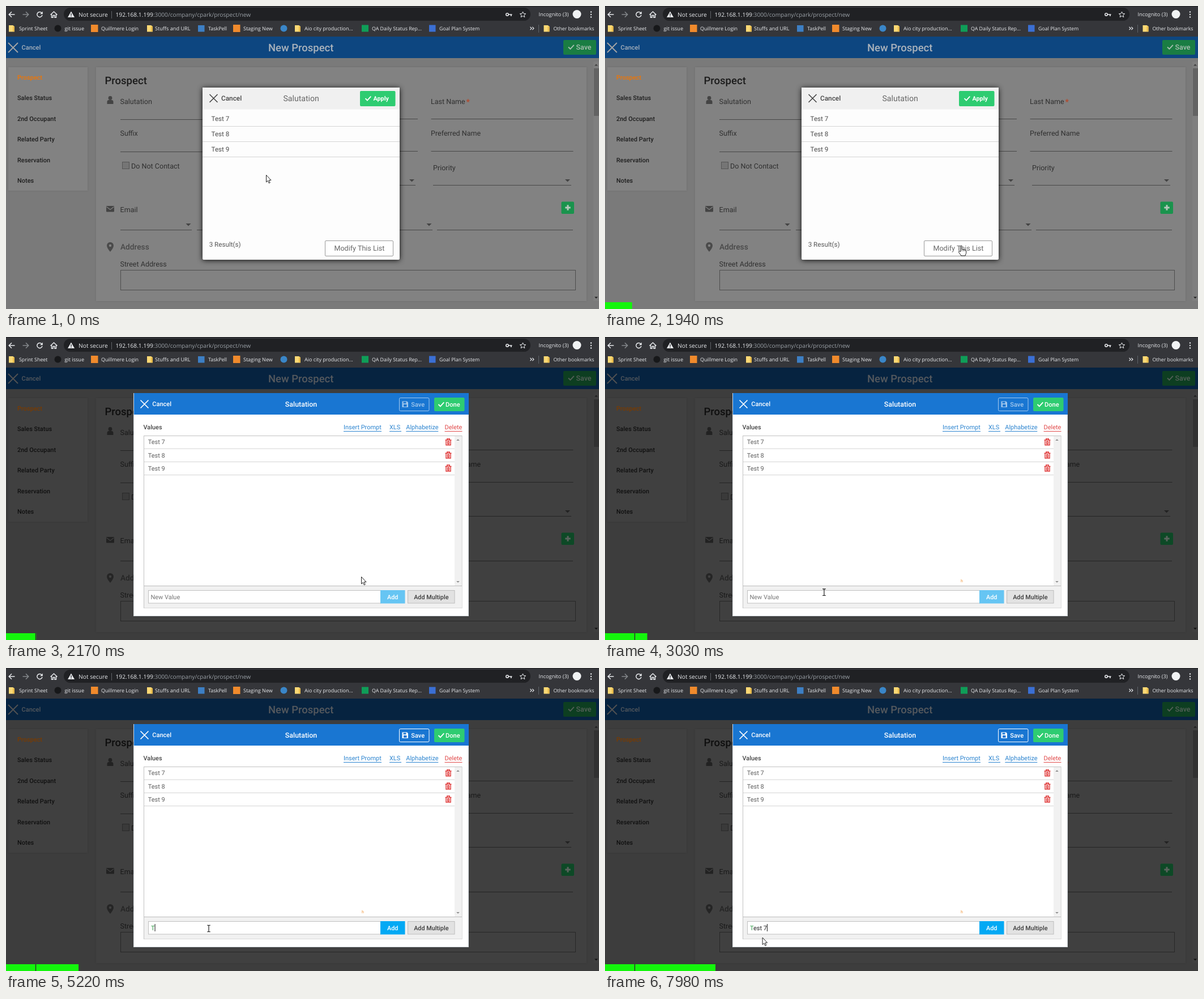
An HTML page that plays this animation: 1047 by 535 pixels, repeating every 8000 ms.

```html
<!DOCTYPE html>
<html lang="en">
<head>
<meta charset="utf-8">
<title>New Prospect</title>
<style>
html, body { margin: 0; width: 100%; height: 100%; overflow: hidden; background: #7a7a7a; }
svg { display: block; width: 100%; height: 100%; }
text { font-family: Roboto, sans-serif; white-space: pre; text-rendering: geometricPrecision; }
.ui text { font-family: "Open Sans", "Noto Sans", sans-serif; }
.card { filter: drop-shadow(0 0 1.5px rgba(0,0,0,.12)); }
.modal { filter: drop-shadow(0 1px 5px rgba(0,0,0,.9)); }
.tab { filter: drop-shadow(0 0 2px rgba(255,225,180,.8)); }
</style>
</head>
<body>
<svg id="stage" viewBox="0 0 1047 535" preserveAspectRatio="none"></svg>
<script>
const text = (x, y, size, fill, str, weight = 400, extra = '') =>
  `<text x="${x}" y="${y}" font-size="${size}" fill="${fill}" font-weight="${weight}" ${extra}>${str}</text>`;
const rect = (x, y, w, h, fill, extra = '') =>
  `<rect x="${x}" y="${y}" width="${w}" height="${h}" fill="${fill}" ${extra}/>`;
const line = (d, color, width = 1, extra = '') =>
  `<path d="${d}" fill="none" stroke="${color}" stroke-width="${width}" ${extra}/>`;
const shape = (d, fill, extra = '') => `<path d="${d}" fill="${fill}" ${extra}/>`;
const circle = (x, y, r, fill) => `<circle cx="${x}" cy="${y}" r="${r}" fill="${fill}"/>`;
const group = (id, body, extra = '') => `<g id="${id}" ${extra}>${body}</g>`;
const rule = (x1, x2, y, color) => rect(x1, y, x2 - x1, 1, color);
const cross = (x, y, r, color, w) =>
  line(`M${x - r} ${y - r}L${x + r} ${y + r}M${x + r} ${y - r}L${x - r} ${y + r}`, color, w);
const check = (x, y, color) => line(`M${x} ${y}l3.4 3.4 6.4 -7`, color, 1.8);
const caretDown = (x, y, color, r = 4.5) => shape(`M${x - r} ${y}h${2 * r}l${-r} ${r}z`, color);
const caretUp = (x, y, color, r = 3) => shape(`M${x - r} ${y}h${2 * r}l${-r} ${-r}z`, color);
const folder = x => shape(`M${x} 34h7l3 2v9.5h-10z`, '#fbd975') + rect(x + 7, 36, 3, 9, '#e8bb4c');

function browser() {
  const w = '#e8eaed', g = '#9aa0a6';
  const labels = [
    [23, 8.9, 'Sprint Sheet'], [103.5, 9.1, 'git issue'], [168, 8.95, 'Quillmere Login'],
    [263, 9.15, 'Stuffs and URL'], [357, 8.95, 'TaskPell'], [419, 9, 'Staging New'],
    [527, 9, 'Aio city production...'], [646, 8.85, 'QA Daily Status Rep...'],
    [765, 8.85, 'Goal Plan System'], [966.5, 8.75, 'Other bookmarks']];
  return rect(0, 0, 1047, 54, '#35363a') + rect(102, 3, 824, 23, '#202124', 'rx="11.5"') +
    rect(0, 0, 1047, 1, '#202124') +
    line('M15.5 15H5.5M10 10.2L5.2 15L10 19.8', w, 1.5) +
    line('M29.5 15H39.5M35 10.2L39.8 15L35 19.8', '#85888c', 1.5) +
    line('M63 12A4.6 4.6 0 1 0 64 16', w, 1.5) + shape('M64.8 9.5v4.7h-4.7z', w) +
    line('M78.5 15.5L84.5 10L90.5 15.5M80.5 14.5V20.3H83V16.5H86V20.3H88.5V14.5', w, 1.5) +
    shape('M115 9.5L121 20H109z', w) + rect(114.4, 13, 1.3, 3.6, '#202124') + rect(114.4, 17.5, 1.3, 1.3, '#202124') +
    text(128, 18.5, 10.25, w, 'Not secure') + rect(186, 9, 1, 13, '#5f6368') +
    text(193.5, 18.5, 10.2, g, `<tspan fill="${w}">192.168.1.199</tspan>:3000/company/cpark/prospect/new`) +
    `<circle cx="885" cy="15" r="2.2" fill="none" stroke="${w}" stroke-width="1.6"/>` +
    line('M887 15H893.5M891.8 15V18', w, 1.7) +
    line('M912.5 10l1.5 3.4 3.7.3-2.8 2.4.9 3.6-3.3-2-3.3 2 .9-3.6-2.8-2.4 3.7-.3z', w, 1) +
    text(940.5, 18.3, 9.2, w, 'Incognito (3)') + circle(1008, 14.5, 7.5, '#f1f3f4') +
    [10.5, 15, 19.5].map(y => circle(1033, y, 1.2, w)).join('') +
    [5, 249, 510, 949.5].map(folder).join('') +
    circle(91.5, 39.5, 6, '#17181a') + rect(150, 33, 12.5, 13, '#f08a2c') + rect(339, 34, 11.5, 11.5, '#3d7fc4') +
    rect(401, 33, 12.5, 13, '#f08a2c') + circle(490.5, 39.5, 6, '#3a86c8') +
    rect(628, 33.5, 12, 12, '#0f9d58') + rect(747, 33.5, 11.5, 12, '#3b6fd4') +
    labels.map(([x, s, str]) => text(x, 42.8, s, w, str)).join('') +
    line('M925.5 36.8l2.6 2.7-2.6 2.7M929.3 36.8l2.6 2.7-2.6 2.7', w, 1.2) + rect(940, 33, 1, 14, '#5f6368');
}

function page() {
  const ink = '#303030', rim = '#484848', icon = '#444';
  const label = (x, y, str) => text(x, y, 12.55, ink, str);
  const side = ['Prospect', 'Sales Status', '2nd Occupant', 'Related Party', 'Reservation', 'Notes'];
  return rect(0, 54, 1047, 481, '#7a7a7a') +
    rect(0, 54, 1047, 38, '#0d4680') +
    cross(12.5, 73.5, 8.5, '#a6a6a6', 1.8) + text(27.5, 77.2, 11, '#a9b2bb', 'Cancel', 500) +
    text(463, 80, 18.45, '#a9b2bb', 'New Prospect', 500) +
    rect(984, 60, 58, 26, '#1a7d43', 'rx="2"') + check(993, 72.5, '#a9bfb1') +
    text(1006.5, 77, 12.5, '#a9bfb1', 'Save', 500) +
    rect(4, 108, 140, 218, '#828282', 'class="card"') + rect(159, 108, 866, 413, '#828282', 'class="card"') +
    side.map((s, i) => text(20, 130 + i * 36.4, 10.95, i ? '#1e1e1e' : '#f27500', s, 500)).join('') +
    text(174.5, 137.5, 18.5, '#1c1c1c', 'Prospect', 500) +
    circle(184, 162.5, 3.4, icon) + shape('M178.5 173v-3.5q0-3.5 3-3.5h5q3 0 3 3.5v3.5z', icon) +
    label(201.5, 172.5, 'Salutation') + label(750, 172.5, 'Last Name') + text(812.5, 174, 14, '#b5482a', '*', 700) +
    label(201.5, 229, 'Suffix') + label(750, 229, 'Preferred Name') +
    [199, 256].map(y => rule(202, 453, y + 1, rim) + rule(476, 727, y, rim) + rule(750.5, 1001.5, y, rim)).join('') +
    rect(205.5, 275.5, 12, 12, '#757575', 'stroke="#555"') + label(221, 287, 'Do Not Contact') +
    label(754, 289.5, 'Priority') + rule(476, 723, 316, rim) + rule(754, 998, 316, rim) +
    caretDown(716.5, 306, icon) + caretDown(991.5, 306, icon) +
    rect(177, 353, 14, 10.5, icon, 'rx="1"') + line('M177.5 354.5l6.5 5 6.5-5', '#828282', 1.2) +
    label(201.5, 364, 'Email') +
    [[202, 328], [337, 453], [476, 753], [761, 1001]].map(([a, b]) => rule(a, b, 395, rim)).join('') +
    caretDown(322, 384, icon) + caretDown(747, 384, icon) +
    rect(980.5, 345.5, 22.5, 21.5, '#1a934d', 'rx="2"') + line('M992 351.3v9.4M987.3 356h9.4', '#b4c8bb', 3) +
    shape('M184 434q-6-7-6-11a6 6 0 0 1 12 0q0 4-6 11z', '#4a4a4a') + circle(184, 423, 2.2, '#828282') +
    text(202, 430, 13.7, '#484848', 'Address', 500) + label(201.5, 460, 'Street Address') +
    rect(202.5, 466.5, 803, 35, 'none', 'stroke="#4e4e4e"') +
    rect(1037, 98, 10, 423, '#7f7f7f') + rect(1038, 110, 9, 84, '#636363') +
    caretUp(1042, 105.5, '#3c3c3c') + caretDown(1042, 513.5, '#1e1e1e', 3);
}

function picker() {
  const ink = '#4c4c4c';
  return `<g class="modal">${rect(347, 144, 348, 304, '#fdfdfd', 'rx="2"')}</g>` + rect(347, 144, 348, 38.5, '#f0f0f0') +
    cross(366.5, 163, 7, '#444', 1.6) + text(380, 167, 11.8, '#444', 'Cancel', 500) +
    text(489.5, 167.5, 14.1, '#666', 'Salutation') +
    rect(625, 150, 62.5, 27, '#2ecc71', 'rx="2"') + check(634.5, 163.2, '#fff') + text(648.5, 167.3, 10.8, '#fff', 'Apply', 700) +
    [7, 8, 9].map((d, i) => text(362.5, 203 + i * 27.1, 11.65, ink, 'Test ' + d) + rule(347, 695, 212 + i * 27, '#d4d4d4')).join('') +
    text(358.7, 425.3, 11.65, '#555', '3 Result(s)') +
    rect(563.5, 414.5, 120, 27, '#fff', 'rx="1.5" stroke="#999"') + text(579.5, 432, 12.55, '#666', 'Modify This List');
}

function trash(y) {
  const c = '#e03c3c';
  return line(`M775.5 ${y - 3.5}h11M778.8 ${y - 4}v-1.8h4.4v1.8`, c, 1.5) +
    line(`M777 ${y - 3}v8.2h8v-8.2M779.7 ${y - 1}v4.2h2.6v-4.2z`, c, 1.5);
}

function editor() {
  const link = (x, w, str, c = '#2a83cf') => text(x, 163.3, 10.95, c, str) + rule(x, x + w, 166, c);
  return rect(225.5, 99.5, 591, 393, '#fff', 'stroke="#d5dbe0"') + rect(226, 99, 591, 38, '#1976d2') +
    cross(244.5, 118.5, 7, '#fff', 1.7) + text(258.3, 122, 11, '#fff', 'Cancel', 500) +
    text(492.8, 123, 12.4, '#fff', 'Salutation', 500) +
    group('save', rect(694.5, 107.5, 52.5, 23, 'none', 'rx="2" stroke="#fff"') +
      shape('M699.5 113.5h8.5l2 2v8.5h-10.5z', '#fff') + rect(701.5, 114.5, 5, 2.8, '#1976d2') + rect(702, 119, 5.5, 4, '#1976d2') +
      text(715.3, 123, 11, '#fff', 'Save', 500)) +
    rect(756, 107, 53.5, 24, '#2ecc71', 'rx="2"') + check(763.5, 119, '#fff') + text(776, 123, 11.1, '#fff', 'Done', 500) +
    text(242.5, 163.3, 10.9, '#444', 'Values', 500) +
    link(596, 67, 'Insert Prompt') + link(677, 21, 'XLS') + link(706.3, 57, 'Alphabetize') + link(774.5, 31, 'Delete', '#e04848') +
    rect(243.5, 174.5, 561.5, 304, '#fff', 'stroke="#c2c2c2"') +
    rect(792, 175, 12.5, 264, '#f1f1f1') + caretUp(798, 183, '#8a8a8a', 2.8) + caretDown(798, 431, '#8a8a8a', 2.8) +
    [7, 8, 9].map((d, i) => text(250.8, 189.3 + i * 23.2, 10.95, '#5c5c5c', 'Test ' + d) +
      rule(244, 792, 196.7 + i * 23.2, '#d4d4d4') + trash(185.5 + i * 23.2)).join('') +
    rect(244, 439, 561, 39.5, '#f1f1f1') + rule(243, 805, 439, '#bdbdbd') +
    rect(251.5, 447.5, 410, 22.5, '#fff', 'stroke="#c0c0c0"') +
    rect(661, 447, 43.5, 23.5, '#66c5f3', 'id="add"') + text(673, 462.6, 10.8, '#fff', 'Add', 500) +
    rect(709.5, 447.5, 82.5, 22.5, '#e2e2e2', 'stroke="#bdbdbd"') + text(720.2, 462.6, 10.8, '#3c3c3c', 'Add Multiple', 500) +
    text(255.5, 462.6, 10.95, '#757575', 'New Value', 400, 'id="hint"') +
    text(256, 462.6, 10.95, '#222', '<tspan id="head" fill="#2f9a45"></tspan><tspan id="tail"></tspan>', 400, 'id="typed"') +
    rect(256, 452, 1, 13, '#111', 'id="caret"') +
    text(628, 432.5, 7, '#f2a75c', 'h', 500, 'id="smudge"');
}

const outline = 'stroke="#222" stroke-width="1" stroke-linejoin="round"';
const pointers = {
  arrow: shape('M.5 .5V13L3.3 10.4L5.2 14.8L7.2 14L5.3 9.6H9z', '#fff', outline),
  hand: shape('M-1.2 1Q0-.8 1.2 1V6.5L3 6.3 5.2 7 7.4 7.6Q9 8 9 10V13.5L7.3 18H.3L-4.2 11.6Q-4.6 9.8-2.8 9.8L-1.2 11z', '#fff', outline) +
    line('M1.2 6.5V10M3.9 7V10M6.5 7.6V10', '#222', .8),
  beam: line('M-2.8 -5.8H-.8L0 -5 .8 -5.8H2.8M0 -5V5M-2.8 5.8H-.8L0 5 .8 5.8H2.8', '#111', 1.1)
};

document.getElementById('stage').innerHTML =
  page() + picker() + rect(0, 54, 1047, 481, '#000', 'id="dim" opacity=".5"') +
  group('loading', `<g class="tab">${rect(488.5, 516.5, 65, 22, '#ffc55f', 'rx="3"')}</g>` +
    text(496.5, 530.5, 10.7, '#222', 'Loading ...', 500, 'font-style="italic"')) +
  group('editor', editor()) + `<g class="ui">${browser()}</g>` +
  rect(0, 523, 0, 12, '#14f50c', 'id="bar"') + rect(51.8, 523, 1.4, 12, '#2c302c', 'id="gap"') +
  group('pointer', Object.entries(pointers).map(([k, v]) => group(k, v)).join(''));

const $ = Object.fromEntries([...document.querySelectorAll('[id]')].map(e => [e.id, e]));
const show = (el, on) => el.setAttribute('visibility', on ? 'visible' : 'hidden');

const LOOP = 8000, STEP = 78, FOCUS = 3500, BLINK = 530;
const keys = [[4850, 'T'], [5230, 'e'], [5340, 's'], [5450, 't'], [6800, ' '], [7500, '7']];
// time, x, y
const track = [[0, 459, 298], [70, 459, 298], [430, 450, 190], [840, 458, 288], [1200, 570, 345],
  [1500, 690, 412], [1780, 628, 423], [2200, 627, 423], [2550, 494, 416], [3250, 358, 460],
  [7730, 358, 460], [7960, 277.5, 475.5]];

function pointerAt(t) {
  const i = track.findIndex(p => p[0] > t);
  if (i < 0) return track[track.length - 1].slice(1);
  const a = track[i - 1], b = track[i], u = (t - a[0]) / (b[0] - a[0]), e = u * u * (3 - 2 * u);
  return [a[1] + (b[1] - a[1]) * e, a[2] + (b[2] - a[2]) * e];
}

function pointerKind(x, y, busy, editing) {
  const inside = (l, t, r, b) => x > l && x < r && y > t && y < b;
  if (editing) return inside(251, 447, 661, 470) ? 'beam' : 'arrow';
  return !busy && (inside(347, 183, 695, 267) || inside(564, 414, 684, 442)) ? 'hand' : 'arrow';
}

function draw(ms) {
  const n = Math.floor(ms / STEP + .35), t = n * STEP;
  const busy = n >= 26, editing = n >= 28;
  show($.dim, busy);
  show($.loading, busy && !editing);
  show($.editor, editing);

  const hit = keys.filter(k => k[0] <= t);
  const str = hit.map(k => k[1]).join('');
  $.head.textContent = str.slice(0, 1);
  $.tail.textContent = str.slice(1);
  $.hint.setAttribute('opacity', str ? 0 : 1);
  $.save.setAttribute('opacity', str ? 1 : .6);
  $.add.setAttribute('fill', str ? '#03a9f4' : '#66c5f3');
  const last = hit.length ? hit[hit.length - 1][0] : FOCUS;
  const lit = t >= FOCUS && Math.floor((t - last) / BLINK) % 2 === 0;
  $.caret.setAttribute('opacity', lit ? 1 : 0);
  $.caret.setAttribute('x', 256 + (str ? $.typed.getComputedTextLength() : 0));
  $.smudge.setAttribute('opacity', n >= 30 ? 1 : 0);

  $.bar.setAttribute('width', n * 1.912);
  show($.gap, editing);

  const [x, y] = pointerAt(t), kind = pointerKind(x, y, busy, editing);
  const dx = kind === 'hand' ? 1 : 0;
  $.pointer.setAttribute('transform', `translate(${x + dx} ${y})`);
  for (const k in pointers) show($[k], k === kind);
}

const start = performance.now();
function tick() {
  draw((performance.now() - start) % LOOP);
  requestAnimationFrame(tick);
}
draw(0);
requestAnimationFrame(tick);
</script>
</body>
</html>
```
